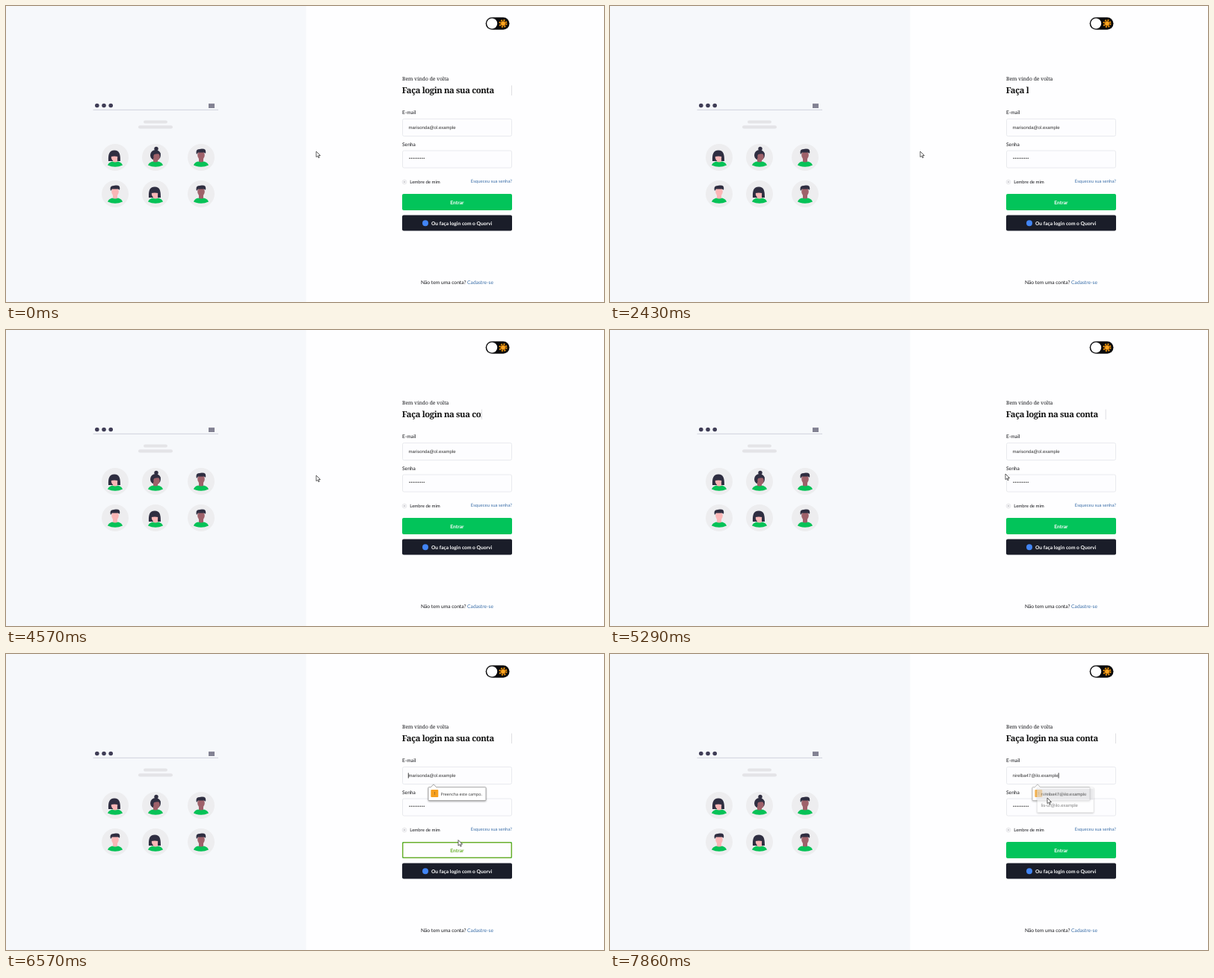
These frames come from a looping animation (800 px wide and 397 px high, 8000 ms). An HTML page:

```html
<!DOCTYPE html>
<html lang="pt-BR">
<head>
<meta charset="utf-8">
<title>Login</title>
<style>
html, body { margin: 0; height: 100%; overflow: hidden; background: #fefeff; }
svg { display: block; width: 800px; height: 397px; }
text { font: 6.7px Lato, sans-serif; fill: #17181c; text-rendering: geometricPrecision; }
.bold { font-weight: 700; }
.small { font-size: 6px; }
.link { fill: #3a6ea8; }
.white { fill: #fff; }
.mid { text-anchor: middle; }
.mail { font: 6px "Liberation Sans", Arial, sans-serif; fill: #333; }
.tip { font: 5.4px "Open Sans", sans-serif; fill: #333; }
.serif { font: 6.8px "Noto Serif", serif; }
.title { font: 700 11.3px "Noto Serif", serif; letter-spacing: -.4px; fill: #111; }
.field { fill: #fdfdff; stroke: #e9eaee; }
.shadow { filter: drop-shadow(.8px 1px 1px #0005); }
</style>
</head>
<body>
<svg viewBox="0 0 800 397">
  <rect width="401.5" height="397" fill="#f6f8fb"/>
  <g fill="#3f3d56">
    <circle cx="121.8" cy="133.5" r="2.8"/><circle cx="131" cy="133.5" r="2.8"/><circle cx="140.2" cy="133.5" r="2.8"/>
    <path d="M271 131.3h8v1.2h-8zm0 2h8v1.2h-8zm0 2h8v1.2h-8z"/>
  </g>
  <path d="M116.5 139.3H284" stroke="#d0d2dc"/>
  <g fill="#e4e4e7">
    <rect x="184" y="153.4" width="32" height="4.2" rx="2.1"/>
    <rect x="177" y="160.3" width="46" height="4.2" rx="2.1"/>
  </g>
  <g id="avatars"></g>

  <rect x="641.7" y="15.2" width="31.8" height="16.6" rx="8.3" fill="#0b0b0d"/>
  <circle cx="650.2" cy="23.5" r="7" fill="#fff"/>
  <circle cx="665" cy="23.5" r="4.5" fill="none" stroke="#f59a0c" stroke-width="2" stroke-dasharray="2 1.53"/>
  <circle cx="665" cy="23.5" r="3.3" fill="#ffa51f" stroke="#8a4b08" stroke-width=".7"/>

  <text class="serif" x="530" y="100.3">Bem vindo de volta</text>
  <clipPath id="reveal"><rect id="revealBox" x="529" y="100" width="148" height="22"/></clipPath>
  <text class="title" x="529.7" y="117" clip-path="url(#reveal)">Faça login na sua conta</text>
  <path id="typeCaret" d="M0 106.5v13.5" stroke="#dfdfe3"/>

  <text x="530" y="145.4">E-mail</text>
  <rect class="field" x="530.5" y="151.5" width="146" height="23" rx="2"/>
  <text class="mail" id="mail" x="538.5" y="165"></text>
  <path id="mailCaret" d="M0 159.5v7" stroke="#111" stroke-width=".8"/>
  <text x="530" y="188">Senha</text>
  <rect class="field" x="530.5" y="194" width="146" height="23" rx="2"/>
  <path d="M540 204.2h19.6" stroke="#333" stroke-width="1.5" stroke-linecap="round" stroke-dasharray="0 2.4"/>

  <circle cx="533" cy="236" r="3" fill="#f2f2f4" stroke="#e2e2e6" stroke-width=".6"/>
  <circle cx="533" cy="236" r="1" fill="#c6c6cc"/>
  <text class="small" x="540.3" y="238.2">Lembre de mim</text>
  <text class="small link" x="677" y="237" text-anchor="end">Esqueceu sua senha?</text>

  <rect x="530" y="252" width="147" height="22" rx="2" fill="#02c45a"/>
  <text class="bold white mid" x="603.4" y="265.6">Entrar</text>
  <g id="hover">
    <rect x="530.7" y="252.7" width="145.6" height="20.6" rx="1.6" fill="#fefeff" stroke="#6ab02e" stroke-width="1.5"/>
    <text class="bold mid" x="603.4" y="265.6" style="fill:#6ab02e">Entrar</text>
  </g>
  <rect x="530" y="280.6" width="147" height="21" rx="2" fill="#1a1d29"/>
  <circle cx="561" cy="291.2" r="4" fill="#4285f4"/>
  <text class="bold white" x="569" y="293.6">Ou faça login com o Quorvi</text>
  <text x="555" y="373">Não tem uma conta? <tspan class="link">Cadastre-se</tspan></text>

  <g id="tooltip">
    <path class="shadow" d="M566 178.6h2.5l3.5-3.8 3.5 3.8H641q1 0 1 1v16q0 1-1 1h-75q-1 0-1-1v-16q0-1 1-1z" fill="#fff" stroke="#8d8d8d" stroke-width=".7"/>
    <rect x="568.3" y="182" width="10" height="10" rx="1" fill="#f7a01d"/>
    <text class="tip white mid bold" x="573.3" y="189.4">!</text>
    <text class="tip" x="581.5" y="189.6">Preencha este campo.</text>
  </g>
  <g id="list">
    <rect class="shadow" x="571.5" y="179" width="75.5" height="33.5" rx="1" fill="#fff" stroke="#d8d8d8" stroke-width=".5"/>
    <rect id="listHover" x="572" y="180.5" width="74.5" height="15" fill="#dcdcdf"/>
    <text class="mail" x="576.5" y="190.2">nirelba47@ilo.example</text>
    <text class="mail" x="576.5" y="205.2">lis-ur@ilo.example</text>
  </g>
  <path id="arrow" d="M0 0v7.6l1.8-1.6 1.2 2.7 1.3-.6-1.2-2.6h2.4z" fill="#fff" stroke="#222" stroke-width=".7"/>
  <path id="beam" d="M-1.6-3h3.2M0-3v6.6M-1.6 3.6h3.2" fill="none" stroke="#222" stroke-width=".9"/>
</svg>
<script>
const $ = id => document.getElementById(id);
const LOOP = 8000, TYPE_START = 1590, TYPE_TIME = 4000;

// Avatars, drawn around their own centre
const PINK = '#fbb6b6', BROWN = '#9f616a', HAIR = '#2f2e41';
const oval = (x, y, rx, ry, fill) => `<ellipse cx="${x}" cy="${y}" rx="${rx}" ry="${ry}" fill="${fill}"/>`;
const path = (d, fill) => `<path d="${d}" fill="${fill}"/>`;
const neck = skin => path('M-3 1h6v6q-3 2-6 0z', skin);
const shirt = path('M-10 10.5Q-9 7-4 5.5q4 2 8 0 5 1.500 6 5Q0 15-10 10.500z', '#06c257');
const heads = {
  bob: skin => path('M-9 5C-9.500-4-8-9.500-1-9.500S7-4 7 5z', HAIR) + neck(skin) + shirt +
    oval(-1, 0, 4.2, 4.8, skin) + path('M-6-1q1-6 5-6t5 6q-5-1-10 0z', HAIR),
  bun: skin => oval(1, -11.5, 2.7, 2.7, HAIR) + oval(0, -3, 7, 7, HAIR) + neck(skin) + shirt +
    oval(1.5, -1, 4.2, 5.3, skin) + path('M-4-3q0-6 5-6t6 5q-6-2-11 1z', HAIR),
  short: skin => neck(skin) + shirt + oval(0, -3, 4.8, 6, skin) +
    path('M-6-4Q-8-11-2-11 0-12 4-11.300q3 1 2 6l-2-1.200h-8z', HAIR),
};
$('avatars').innerHTML = [
  [146, 203, 'bob', PINK], [200, 203, 'bun', BROWN], [261, 203, 'short', BROWN],
  [146, 252, 'short', PINK], [200, 252, 'bob', PINK], [261, 252, 'short', BROWN],
].map(([x, y, kind, skin]) =>
  `<g transform="translate(${x} ${y})">${oval(0, 0, 18, 18, '#ededef')}${heads[kind](skin)}</g>`).join('');

// Pointer stops: time, x, y
const stops = [
  [0, 415, 195], [4600, 415, 195], [5290, 529, 193], [5900, 603, 251], [6150, 605, 249.5],
  [6680, 605, 249.5], [7000, 565, 166], [7120, 565, 167], [7290, 569, 196.5],
  [7600, 585, 193], [LOOP, 585, 193],
];
const ramp = (t, from, to) => Math.min(1, Math.max(0, (t - from) / (to - from)));
const smooth = k => k * k * (3 - 2 * k);
const show = (id, opacity) => $(id).setAttribute('opacity', +opacity);
const move = (id, x, y = 0) => $(id).setAttribute('transform', `translate(${x} ${y})`);

function pointerAt(t) {
  const i = stops.findIndex(s => s[0] > t);
  const [t0, x0, y0] = stops[i - 1], [t1, x1, y1] = stops[i];
  const k = smooth(ramp(t, t0, t1));
  return [x0 + (x1 - x0) * k, y0 + (y1 - y0) * k];
}

function draw(t) {
  // Heading is wiped in by 44 steps
  const typed = t < TYPE_START ? 1 : Math.floor(ramp(t, TYPE_START, TYPE_START + TYPE_TIME) * 44) / 44;
  const edge = 530 + 146.5 * typed;
  $('revealBox').setAttribute('width', edge - 529);
  move('typeCaret', edge);
  show('typeCaret', t < TYPE_START || t > 4000);

  const picked = t >= 7500;
  $('mail').textContent = picked ? 'nirelba47@ilo.example' : 'marisonda@ol.example';
  move('mailCaret', picked ? 539 + $('mail').getComputedTextLength() : 538.3);
  show('mailCaret', t >= 6350);

  show('hover', ramp(t, 5900, 6100) * (1 - ramp(t, 6750, 6950)));
  const fade = ramp(t, 7720, 8000);
  show('tooltip', ramp(t, 6330, 6430) * (1 - fade * .5));
  show('list', t >= 7140 ? 1 - fade * .8 : 0);
  show('listHover', picked);

  const [x, y] = pointerAt(t);
  const inField = x > 530 && x < 677 && (y > 151 && y < 175 || y > 194 && y < 217);
  move('arrow', x, y);
  move('beam', x, y);
  show('arrow', !inField);
  show('beam', inField);
}

const start = performance.now();
(function tick() {
  draw((performance.now() - start) % LOOP);
  requestAnimationFrame(tick);
})();
</script>
</body>
</html>
```
